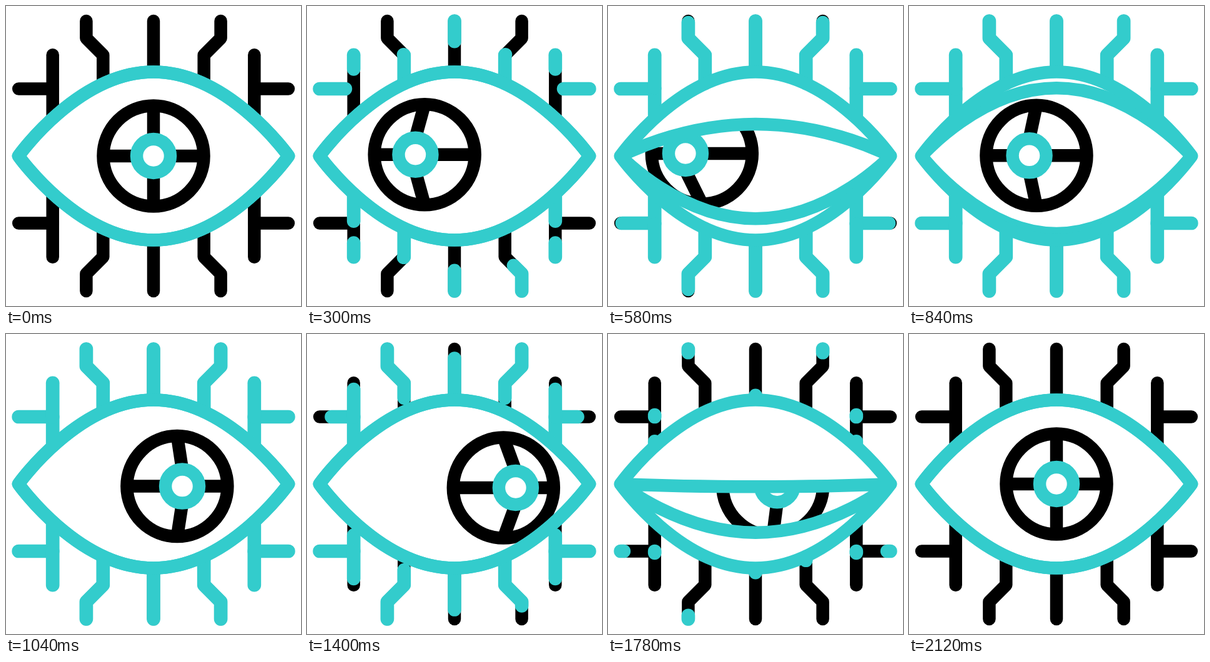
An HTML page with a canvas that plays this animation: 472 by 480 pixels, repeating every 2400 ms.

```html
<!DOCTYPE html>
<html lang="en">
<head>
<meta charset="utf-8">
<title>Scanning eye</title>
<style>
html, body { margin: 0; width: 100%; height: 100%; overflow: hidden; background: #fff; }
canvas { display: block; }
</style>
</head>
<body>
<canvas id="stage" width="472" height="480"></canvas>
<script>
const ctx = document.getElementById('stage').getContext('2d');
const W = 472, H = 480, CX = 236, CY = 240, LOOP = 2400, STEP = 20;
const TEAL = '#33cccc', BLACK = '#000', LINE = 20.5;
const TOP = 105.5, BOTTOM = 374.5;

const mirror = path => path.map(([x, y]) => [W - x, y]);
const flip = path => path.map(([x, y]) => [x, H - y]);
const reverse = path => [...path].reverse();

// Each circuit trace is listed in the direction the colour runs along it.
const side = [
  [[20.2, 132.5], [74.7, 132.5], [74.7, 177]],
  [[74.7, 78.3], [74.7, 132.5]],
  [[74.7, 303], [74.7, 347.5], [20.2, 347.5]],
  [[74.7, 401.7], [74.7, 347.5]],
  [[155.3, 123.5], [155.3, 78.5], [128.4, 51.5], [128.4, 24]]
];
const bent = flip(side[4]);
const middle = [[CX, 24], [CX, 102.5]];
const traces = [
  ...side, ...side.map(mirror),
  bent, reverse(mirror(bent)),
  middle, flip(middle)
];

const clamp = v => Math.min(1, Math.max(0, v));
const span = (t, a, b) => clamp((t - a) / (b - a));
const ease = p => (1 - Math.cos(Math.PI * p)) / 2;

// Eased value along a list of [time, value] keys.
function keyed(t, keys) {
  for (let i = 1; i < keys.length; i++) {
    const [t0, v0] = keys[i - 1], [t1, v1] = keys[i];
    if (t < t1) return v0 + (v1 - v0) * ease(span(t, t0, t1));
  }
  return keys[keys.length - 1][1];
}

const glance = (t, left, right) => keyed(t, [[0, 0], [560, left], [1290, right], [2100, 0]]);
const blink = t => keyed(t, [[488, 0], [688, 1], [888, 0], [1650, 0], [1850, 1], [2050, 0]]);

function stroke(color, width = LINE, cap = 'round') {
  ctx.strokeStyle = color;
  ctx.lineWidth = width;
  ctx.lineCap = cap;
  ctx.lineJoin = 'round';
  ctx.stroke();
}

function polyline(path) {
  ctx.beginPath();
  path.forEach(([x, y]) => ctx.lineTo(x, y));
}

function drawPart(path, from, to) {
  if (to <= from) return;
  let length = 0;
  for (let i = 1; i < path.length; i++) {
    length += Math.hypot(path[i][0] - path[i - 1][0], path[i][1] - path[i - 1][1]);
  }
  ctx.setLineDash([(to - from) * length, 1000]);
  ctx.lineDashOffset = -from * length;
  polyline(path);
  stroke(TEAL, 21.7);
  ctx.setLineDash([]);
}

function almond(top, bottom) {
  ctx.beginPath();
  ctx.moveTo(20, CY);
  ctx.bezierCurveTo(20, CY, 115, top, CX, top);
  ctx.bezierCurveTo(W - 115, top, 452, CY, 452, CY);
  ctx.bezierCurveTo(452, CY, W - 115, bottom, CX, bottom);
  ctx.bezierCurveTo(115, bottom, 20, CY, 20, CY);
  ctx.closePath();
}

function ring(x, y, r, color) {
  ctx.beginPath();
  ctx.arc(x, y, r, 0, 2 * Math.PI);
  stroke(color);
}

function drawIris(t) {
  const x = CX + glance(t, -86, 82);
  const px = CX + glance(t, -112.5, 102.5);
  const y = CY + glance(t, -4, 6.3);
  const R = 80.5, r = 27;
  for (const [dx, dy] of [[0, -1], [1, 0], [0, 1], [-1, 0]]) {
    polyline([[x + dx * R, y + dy * R], [px + dx * r, y + dy * r]]);
    stroke(BLACK, LINE, 'butt');
  }
  ring(x, y, R, BLACK);
  ring(px, y, r, TEAL);
}

function draw(t) {
  ctx.fillStyle = '#fff';
  ctx.fillRect(0, 0, W, H);

  for (const path of traces) {
    polyline(path);
    stroke(BLACK);
  }
  const from = span(t, 1304, 1806), to = span(t, 92, 592);
  for (const path of traces) drawPart(path, from, to);

  const shut = blink(t);
  const top = TOP + 190.8 * shut, bottom = BOTTOM - 78.2 * shut;
  ctx.save();
  almond(top, bottom);
  ctx.clip();
  drawIris(t);
  ctx.restore();

  almond(top, bottom);
  stroke(TEAL);
  almond(TOP, BOTTOM);
  stroke(TEAL);
}

function tick() {
  const t = performance.now() % LOOP;
  draw(Math.floor(t / STEP) * STEP);
  requestAnimationFrame(tick);
}
tick();
</script>
</body>
</html>
```
